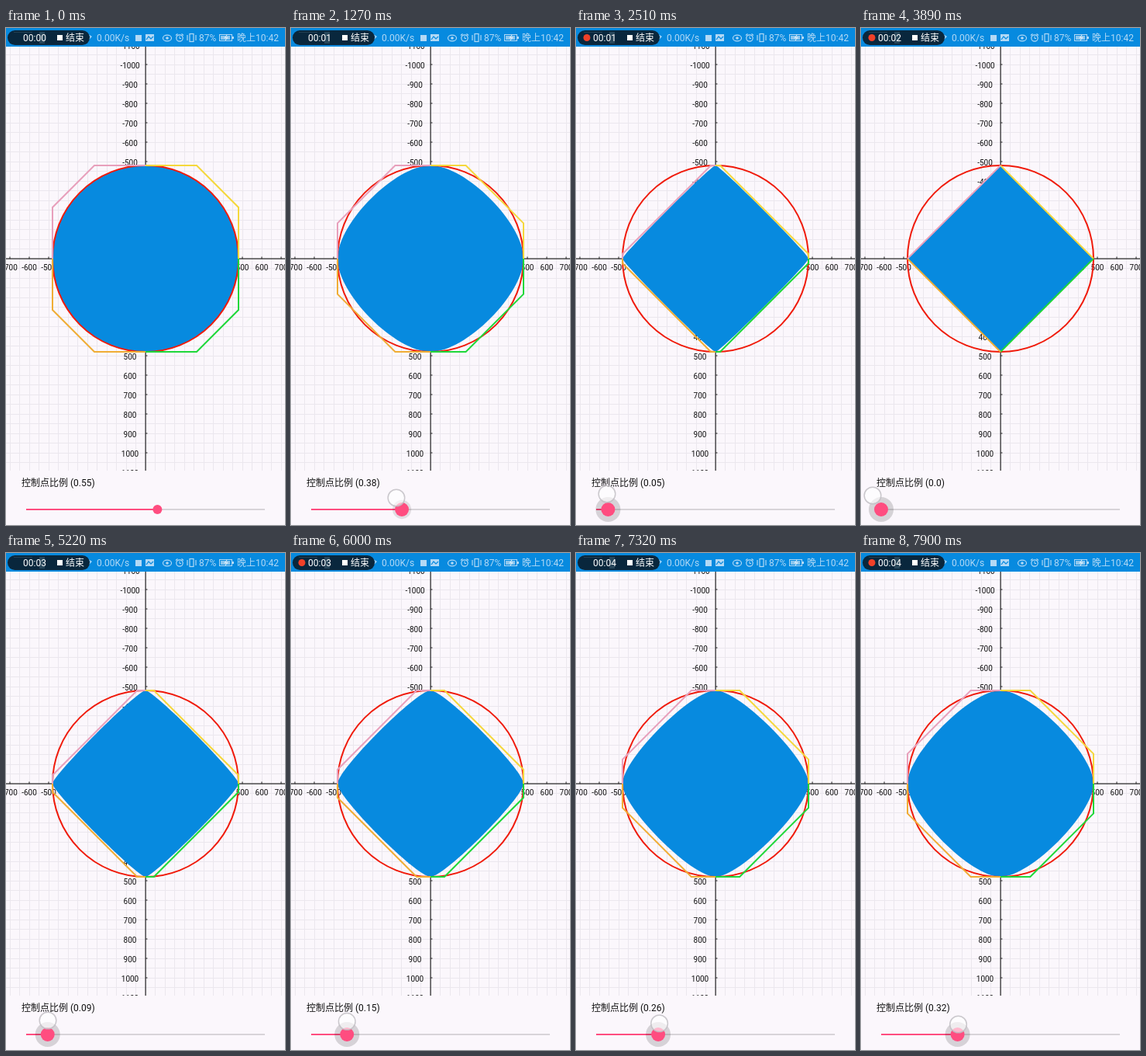
These frames come from a looping animation (360 by 640 pixels, 8000 ms). An HTML page with a canvas:

```html
<!DOCTYPE html>
<html lang="zh">
<head>
<meta charset="utf-8">
<style>
  html, body { margin: 0; width: 100%; height: 100%; overflow: hidden; background: #fbf7fc; }
  canvas { display: block; width: 360px; height: 640px; }
</style>
</head>
<body>
<canvas id="stage" width="360" height="640"></canvas>
<script>
const ctx = document.getElementById('stage').getContext('2d');
const LOOP = 8000, TAU = Math.PI * 2;
const CX = 180, CY = 297, R = 120, UNIT = 25;
const BLUE = '#078adf', PINK = '#ff4d80', PAPER = '#fbf7fc', ICON = '#b3d9f5';
const BLINK = 1735;

// [time, value] tracks
const ratioTrack = [[600, .55], [1270, .383], [1900, .2], [2510, .053], [3000, 0],
  [4200, 0], [5220, .092], [6720, .203], [7900, .323]];
const fingerX = [[600, 190], [1270, 136], [1900, 84], [2510, 40], [3130, 19], [3890, 15],
  [4200, 22], [5220, 54], [6720, 89], [7900, 125.5]];
const fingerY = [[600, 607], [1270, 605], [2510, 600], [3890, 602], [5220, 602], [6720, 604.5], [7900, 607]];

function sample(track, t) {
  if (t <= track[0][0]) return track[0][1];
  for (let i = 1; i < track.length; i++) {
    const [t0, a] = track[i - 1], [t1, b] = track[i];
    if (t < t1) return a + (b - a) * (t - t0) / (t1 - t0);
  }
  return track[track.length - 1][1];
}

const ramp = (t, from, to) => Math.min(1, Math.max(0, (t - from) / (to - from)));

function rect(x, y, w, h, color) {
  ctx.fillStyle = color;
  ctx.fillRect(x, y, w, h);
}

function disc(x, y, r, fill, stroke, width = 1.5) {
  ctx.beginPath();
  ctx.arc(x, y, r, 0, TAU);
  if (fill) { ctx.fillStyle = fill; ctx.fill(); }
  if (stroke) { ctx.strokeStyle = stroke; ctx.lineWidth = width; ctx.stroke(); }
}

function line(points, color, width) {
  ctx.beginPath();
  points.forEach(([x, y]) => ctx.lineTo(x, y));
  ctx.strokeStyle = color;
  ctx.lineWidth = width;
  ctx.stroke();
}

function text(str, x, y, size, color, align = 'left') {
  ctx.font = `${size}px Roboto, "Noto Sans CJK SC", "Noto Sans CJK", sans-serif`;
  ctx.textAlign = align;
  ctx.fillStyle = color;
  ctx.fillText(str, x, y);
}

function drawGrid() {
  for (let x = 5; x < 360; x += UNIT / 2) rect(Math.floor(x), 24, 1, 546, '#ebe7ee');
  for (let y = CY - 21 * UNIT / 2; y < 570; y += UNIT / 2) rect(0, Math.floor(y), 360, 1, '#ebe7ee');
  rect(CX - .5, 24, 1.2, 546, '#222');
  rect(0, CY - .5, 360, 1.2, '#222');
  for (let n = -11; n <= 11; n++) {
    if (!n) continue;
    const x = CX + n * UNIT, y = CY + n * UNIT;
    rect(CX, y - .5, 2.5, 1, '#222');
    text(n * 100, 160, y + 4.7, 10, '#111', 'center');
    if (Math.abs(n) < 8) {
      rect(x - .5, CY - 2.5, 1, 2.5, '#222');
      text(n * 100, x, 312, 10, '#111', 'center');
    }
  }
}

function drawShape(ratio) {
  const h = R * ratio;
  // Each quadrant: start, two control points, end
  const quadrants = [[1, -1, '#f5d83c'], [1, 1, '#1fd83a'], [-1, 1, '#f0ad35'], [-1, -1, '#e8a0bc']]
    .map(([sx, sy, color]) => ({ color, points: [
      [CX, CY + sy * R], [CX + sx * h, CY + sy * R],
      [CX + sx * R, CY + sy * h], [CX + sx * R, CY]] }));

  ctx.fillStyle = BLUE;
  for (const { points: [a, b, c, d] } of quadrants) {
    ctx.beginPath();
    ctx.moveTo(CX, CY);
    ctx.lineTo(...a);
    ctx.bezierCurveTo(...b, ...c, ...d);
    ctx.fill();
  }
  rect(CX - 1, CY - R + 2, 2, 2 * R - 4, BLUE);
  rect(CX - R + 2, CY - 1, 2 * R - 4, 2, BLUE);
  disc(CX, CY, R, null, '#f01a0a', 2);
  quadrants.forEach(q => line(q.points, q.color, 2));
}

function drawStatusBar(t) {
  rect(0, 0, 360, 24, BLUE);
  line([[101, 10], [105, 8], [110, 11], [105, 16]], ICON, 1.2);
  ctx.fillStyle = '#09273d';
  ctx.beginPath();
  ctx.roundRect(2, 3, 106, 19, 9.5);
  ctx.fill();
  rect(10, 5, 24, 1, '#244052');
  rect(43, 5, 7, 15, '#27465a');

  const dotOn = t >= 420 && (t - 420) % BLINK < 840;
  if (dotOn) disc(14, 12.5, 4.5, '#f04028');
  const seconds = Math.max(0, Math.floor((t - 1260) / BLINK) + 1);
  text('00:0' + seconds, 22, 17, 12, '#fff');
  rect(66, 9, 7, 7, '#fff');
  text('结束', 77, 17, 12, '#fff');
  text('0.00K/s', 117, 17, 12, ICON);

  rect(167, 9, 8, 8, ICON);
  rect(180, 8, 11, 9, ICON);
  line([[181, 15], [184, 11], [187, 14], [190, 11]], BLUE, 1.2);

  ctx.beginPath();
  ctx.ellipse(208, 13, 5.5, 3.8, 0, 0, TAU);
  ctx.lineWidth = 1.2;
  ctx.strokeStyle = ICON;
  ctx.stroke();
  disc(208, 13, 1.8, ICON);
  disc(224, 13, 4.2, null, ICON, 1.2);
  line([[224, 10.5], [224, 13.5], [226, 13.5]], ICON, 1);
  line([[219, 9.5], [221.5, 7.5]], ICON, 1.2);
  line([[226.5, 7.5], [229, 9.5]], ICON, 1.2);
  ctx.strokeRect(237, 7.5, 5, 10);
  line([[234, 9], [234, 16]], ICON, 1.2);
  line([[245, 9], [245, 16]], ICON, 1.2);

  text('87%', 249, 17, 12, ICON);
  ctx.strokeStyle = ICON;
  ctx.lineWidth = 1;
  ctx.strokeRect(275.5, 8.5, 16, 8);
  rect(277, 10, 12, 5, '#8cc7ef');
  rect(292, 11, 2, 3, ICON);
  line([[285, 9], [282, 13], [286, 12], [283, 16]], '#e5f3fc', 1);
  text('晚上10:42', 352, 17, 12, ICON, 'right');
}

function drawSlider(ratio, t) {
  const x = 26 + 308 * ratio;
  const press = ramp(t, 800, 1250), halo = ramp(t, 900, 1550);
  rect(0, 570, 360, 70, PAPER);
  const label = String(ratio).includes('.') ? ratio : ratio + '.0';
  text(`控制点比例 (${label})`, 20, 589.5, 12, '#111');
  rect(26, 619, 308, 2, '#d8d4d9');
  rect(26, 619, x - 26, 2, PINK);
  if (halo) disc(x, 620, 7 + 9 * halo, `rgba(0,0,0,${.04 + .11 * halo})`);
  disc(x, 620, 6 + 3 * press, PINK);
  if (t >= 600) disc(sample(fingerX, t), sample(fingerY, t), 10.8, 'rgba(255,255,255,.6)', 'rgba(190,188,193,.8)');
}

function frame(now) {
  const t = now % LOOP;
  const ratio = Math.round(sample(ratioTrack, t) * 100) / 100;
  rect(0, 0, 360, 640, PAPER);
  drawGrid();
  drawShape(ratio);
  drawSlider(ratio, t);
  drawStatusBar(t);
  requestAnimationFrame(frame);
}

const start = performance.now();
(function loop() {
  requestAnimationFrame(function tick() {
    const t = (performance.now() - start) % LOOP;
    const ratio = Math.round(sample(ratioTrack, t) * 100) / 100;
    rect(0, 0, 360, 640, PAPER);
    drawGrid();
    drawShape(ratio);
    drawSlider(ratio, t);
    drawStatusBar(t);
    requestAnimationFrame(tick);
  });
})();
</script>
</body>
</html>
```
